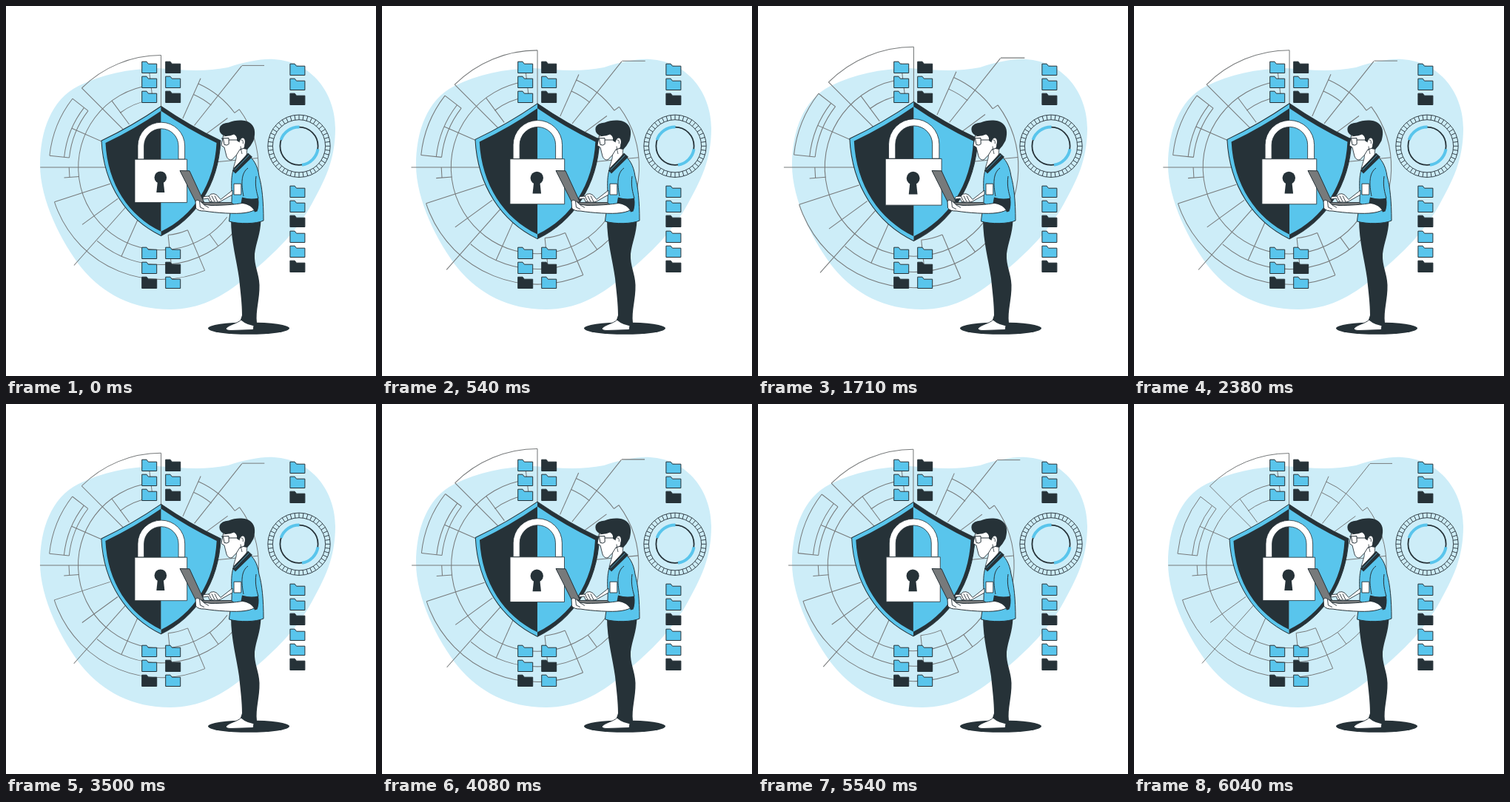
These frames come from a looping animation (500x500 px, 6.08 s). An HTML page with a canvas:

```html
<!DOCTYPE html>
<html lang="en">
<head>
<meta charset="utf-8">
<title>Data security</title>
<style>
html, body { margin: 0; width: 100%; height: 100%; overflow: hidden; background: #fff; }
canvas { display: block; width: 500px; height: 500px; }
</style>
</head>
<body>
<canvas id="stage"></canvas>
<script>
const canvas = document.getElementById('stage');
const dpr = Math.max(1, window.devicePixelRatio || 1);
canvas.width = canvas.height = 500 * dpr;
const ctx = canvas.getContext('2d');

const BLUE = '#59c5ec', PALE = '#cdedf8', DARK = '#263238', GREY = '#777a7b', WHITE = '#fff';
const LOOP = 6080;
const RAD = Math.PI / 180;
const CX = 209.5, CY = 218; // hub of circuit and shield

// Steady growth up to a peak, then a slightly softened fall
function swell(t, peak, up, down) {
  if (t < peak) return Math.max(0, 1 - (peak - t) / up);
  return Math.max(0, 1 - (t - peak) / down) ** 1.1;
}

// One slow and one quick pulse per loop
const zoomAt = t => 1 + .098 * (swell(t, 1190, 1190, 2380) + swell(t, 4790, 1200, 1230));

function shape(d, fill, stroke, width = 1) {
  const p = new Path2D(d);
  if (fill) { ctx.fillStyle = fill; ctx.fill(p); }
  if (stroke) { ctx.strokeStyle = stroke; ctx.lineWidth = width; ctx.stroke(p); }
}

function ring(x, y, r, color, width, from = 0, to = 360) {
  ctx.beginPath();
  ctx.arc(x, y, r, from * RAD, to * RAD);
  ctx.strokeStyle = color;
  ctx.lineWidth = width;
  ctx.stroke();
}

function ray(x, y, deg, r0, r1) {
  const c = Math.cos(deg * RAD), s = Math.sin(deg * RAD);
  ctx.beginPath();
  ctx.moveTo(x + r0 * c, y + r0 * s);
  ctx.lineTo(x + r1 * c, y + r1 * s);
  ctx.stroke();
}

function ellipse(x, y, rx, ry, fill, turn = 0) {
  ctx.beginPath();
  ctx.ellipse(x, y, rx, ry, turn, 0, 2 * Math.PI);
  ctx.fillStyle = fill;
  ctx.fill();
}

function zoom(x, y, k) {
  ctx.translate(x, y);
  ctx.scale(k, k);
  ctx.translate(-x, -y);
}

function blob() {
  shape('M46 215C46 170 61 126 98 108C130 92 165 85 205 84C235 86 265 90 300 83C325 75 345 71 362 72' +
    'C415 75 445 120 445 165C445 210 430 236 414 266C389 312 355 340 325 366' +
    'C293 394 260 410 222 410C170 410 132 389 103 355C75 320 46 262 46 215Z', PALE);
}

// Rings are evenly spaced; levels count outwards from the shield
const radius = level => 92 + 19.8 * level;

function circuit() {
  const arc = (level, from, to) => ring(CX, CY, radius(level), GREY, 1, from, to);
  const spoke = (deg, to, from = -1) => ray(CX, CY, deg, radius(from), radius(to));

  arc(1, 37, 263);
  arc(2, 40, 131);
  arc(2, -36.5, 40);
  arc(3, 225, 270);
  arc(3, 67, 162);
  arc(0, 67, 84);
  arc(0, 233, 261);
  arc(.8, -66, -51);
  arc(1.6, -66, -36.5);

  // Spokes that start behind the shield
  spoke(270, 3);
  spoke(225, 3);
  spoke(203.6, 2);
  spoke(180, 3.6);
  spoke(162, 3);
  spoke(144, 2);
  spoke(131.6, 4.3);
  spoke(114, 2);
  spoke(-5.5, 2);
  spoke(-36.5, 1);
  spoke(-51.5, 4.2);
  spoke(-66, 2);
  spoke(233.5, 1);
  shape('M318.9 80.4H349', null, GREY);

  // Short links between rings
  spoke(67, 3, 0);
  spoke(84, 2, 0);
  spoke(54, 2, 1);
  spoke(263, 2, 0);
  spoke(-36.5, 2, 1.6);
  shape('M85.2 218L86 231.4M78.5 232L99 230.4', null, GREY);

  // Bracket on the left
  for (const level of [1.65, 2, 3]) arc(level, 186, 217.8);
  for (const deg of [186, 217.8]) spoke(deg, 3, 1.65);
}

const SHIELD = 'M209.5 135.5Q171 162 129 182C132 242 163 288 209.5 310.5' +
  'C256 288 287 242 290 182Q248 162 209.5 135.5Z';

function shield() {
  [[0, BLUE, DARK], [CX, DARK, BLUE]].forEach(([x, rim, core]) => {
    ctx.save();
    ctx.beginPath();
    ctx.rect(x, 100, CX, 250);
    ctx.clip();
    shape(SHIELD, rim);
    zoom(CX, 226, .932);
    shape(SHIELD, core);
    ctx.restore();
  });
  shape(SHIELD, null, DARK);
}

function lock() {
  shape('M178 207V189A31.8 31.8 0 0 1 241.6 189V207H233V189A23.2 23.2 0 0 0 186.6 189V207Z', WHITE, DARK, .8);
  shape('M174 207.2H244.6V265.6H174Z', WHITE, DARK, .8);
  ellipse(208.8, 231.7, 8.3, 8.3, DARK);
  shape('M205 236H212.6L214.3 252H203.3Z', DARK);
}

// A column of folders, one letter each: b = blue, d = dark
function stack(x, y, colors) {
  [...colors].forEach((c, i) => {
    shape(`M${x} ${y + i * 20}h6.3l2.3 3h11.4v12.3h-20Z`, c === 'b' ? BLUE : DARK, DARK);
  });
}

function folders() {
  stack(183.7, 75.2, 'bbb');
  stack(215.7, 75.2, 'dbd');
  stack(183.7, 326.2, 'bbd');
  stack(215.7, 326.2, 'bdb');
  stack(383.9, 78.2, 'bbd');
  stack(383.9, 243.2, 'bbd');
  stack(383.9, 304.2, 'bbd');
}

function dial() {
  const x = 396, y = 189.3, ticks = 44;
  ring(x, y, 42.2, DARK, .9);
  ring(x, y, 35.6, DARK, .9);
  for (let i = 0; i < ticks; i++) ray(x, y, i * 360 / ticks, 35.6, 42);
  ring(x, y, 25.6, DARK, 1.8);
  for (const from of [9, 199]) ring(x, y, 25.8, BLUE, 4, from, from + 72);
}

function legs() {
  ellipse(328, 435.6, 55, 8.2, DARK);
  shape('M318 424C311 430 302 430 297 436Q298 438.5 304 438.5L334 437.5L335 432Z', WHITE, DARK, .9);
  shape('M304 288C304 318 312 345 315 368C317 388 319 402 319 418L317 424Q326 432 337.5 432L339 428' +
    'C337 412 343 396 342.5 377C342 361 335 351 336 335C338 319 344 308 344.5 289Z', DARK);
}

function head() {
  shape('M312 196L311 206L307 220L325 202L326 190Z', WHITE, DARK, .8);
  shape('M294 173L291 188.5L295 191L298 203Q300 208.5 305 208Q312 202 316 194L328 190L324 168L300 166Z', WHITE, DARK, .9);
  shape('M288.6 164.5Q291 158 301 157.5C310 153.5 325 153 331 159C338 165 336.5 175 334.5 182' +
    'Q331 189 326 194L321 193Q324 186 320.5 180L316.5 185L312 182Q313 176 308 173.5Q298 178 292 173.8Q287.5 170 288.6 164.5Z', DARK);
  ellipse(319.2, 184.2, 3.6, 5.8, WHITE, .2);
  shape('M317.5 181Q321 180.5 320.3 186M317 189.5Q317.5 195 319 200', null, DARK, .8);
  shape('M291 179L301 178.5L301.2 186.5Q299 189 295 187.5L293.5 179M301 181H316M294.5 176L299 175', null, DARK);
}

function torso() {
  shape('M326 201C334 206 340 215 342 230C346 244 348 264 348 290C338 294.5 315 295 301.5 291' +
    'C302.5 278 306 270 305 252C304.5 240 304.5 230 307 222Z', BLUE, DARK);
  shape('M327 198.5L333 204L310 226.5L305.8 222Z', DARK);
  shape('M309 221.5L328.5 201.5', null, BLUE, .7);
  shape('M308 240.2H317.8V255H308Z', WHITE, DARK, .9);
  shape('M321 257C318 242 317 226 327 219M338 230C336 243 339 252 341 260', null, DARK);
}

function laptop() {
  shape('M235 222.5L248 222.8L267.5 265H256.5Z', GREY, DARK);
  shape('M262 265.5H304L311 270H266Z', GREY, DARK, .9);
}

function hands() {
  // Far hand on the keys
  shape('M306 255L290 264Q286 266 275 264.5L273.5 260L266.5 261Q265 258.5 268 257.5L274 257' +
    'L277 254.2Q281 252.5 285 255.5L290 261.5L306 249Z', WHITE, DARK, .9);
  for (const x of [274, 278, 282]) shape(`M${x} 256.5l4 8`, null, DARK, .9);
  // Near arm
  shape('M322 266C309 268.5 291 269.5 277 269.5L267 268L262 263.5Q258 261 256 263.5L256.5 273' +
    'Q260 277.5 268 277C283 279.5 311 281.5 323 279.5Q334 278 340 273L339 264Z', WHITE, DARK);
  shape('M261.5 264L262.5 272L268 274.5M267 268.3L274 272.5', null, DARK, .9);
  shape('M319 258.5Q330 262 341 259.5Q342.5 270 339.5 277.5L336 278.5Q333 268.5 317.5 266.5Z', DARK);
}

function draw(now) {
  ctx.setTransform(dpr, 0, 0, dpr, 0, 0);
  ctx.fillStyle = WHITE;
  ctx.fillRect(0, 0, 500, 500);
  ctx.lineJoin = 'round';
  blob();

  ctx.save();
  zoom(197.5, 218, zoomAt(now % LOOP));
  circuit();
  shield();
  lock();
  ctx.restore();

  folders();
  dial();
  legs();
  head();
  torso();
  laptop();
  hands();
  requestAnimationFrame(draw);
}
draw(performance.now());
</script>
</body>
</html>
```
